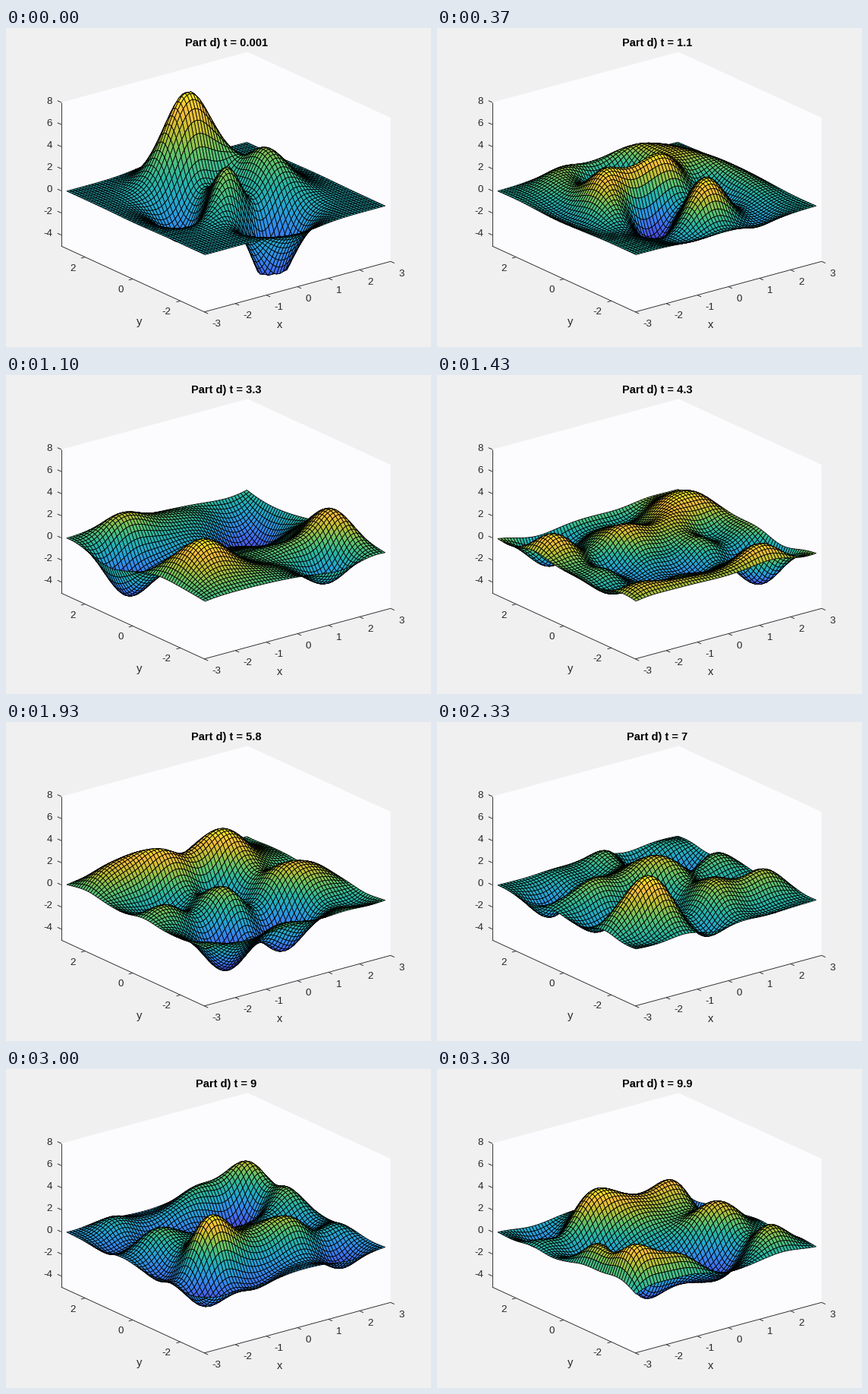
Recreate the animation shown at these times as a matplotlib script. Size 560 px wide and 420 px high, loop 3.33 s.

```python
import numpy as np
import matplotlib.pyplot as plt
from matplotlib.animation import FuncAnimation
from matplotlib.collections import PolyCollection
from matplotlib.colors import LinearSegmentedColormap

W, H = 560, 420
FRAMES, INTERVAL = 111, 30
PT = 0.72  # points per pixel at 100 dpi
Z_MIN, Z_MAX = -5, 8
INK = "#262626"

plt.rcParams["font.family"] = "Liberation Sans"

# Orthographic view: azimuth -37.5, elevation 30, stretched to the axes box
AZ, EL = np.radians(37.5), np.radians(30)
LEFT, BOTTOM, WIDTH, HEIGHT = 0.13 * W, 0.89 * H, 0.775 * W, 0.815 * H
SPAN = np.cos(AZ) + np.sin(AZ)
SX = WIDTH / SPAN
SY = HEIGHT / (SPAN * np.sin(EL) + np.cos(EL))


def project(x, y, z):
    """Stage pixels of a point in data coordinates."""
    u, v, w = (x + 3) / 6, (y + 3) / 6, (z - Z_MIN) / (Z_MAX - Z_MIN)
    px = LEFT + SX * (np.sin(AZ) * (1 - v) + np.cos(AZ) * u)
    rise = (np.sin(AZ) * u + np.cos(AZ) * v) * np.sin(EL) + np.cos(EL) * w
    return px, BOTTOM - SY * rise


def peaks(x, y):
    return (3 * (1 - x) ** 2 * np.exp(-x**2 - (y + 1) ** 2)
            - 10 * (x / 5 - x**3 - y**5) * np.exp(-x**2 - y**2)
            - np.exp(-(x + 1) ** 2 - y**2) / 3)


# Wave equation with fixed edges, solved by sine modes on the inner grid
N = 60
step = 6 / N
k = np.arange(1, N)
X, Y = np.meshgrid(-3 + step * k, -3 + step * k)
modes = np.sin(np.pi * np.outer(k, k) / N)
coef = (2 / N) ** 2 * modes @ peaks(X, Y) @ modes
lam = (2 / step * np.sin(np.pi * k / (2 * N))) ** 2
omega = np.sqrt(lam[:, None] + lam[None, :])


def wave(t):
    return modes @ (coef * np.cos(omega * t)) @ modes


# Evenly spaced key colours, indigo to yellow
cmap = LinearSegmentedColormap.from_list("heat", [
    "#423cc4", "#4661ea", "#3587ee", "#24a6d2", "#27b6a4",
    "#62c46c", "#bcc034", "#fabd3c", "#f8f41c"])

fig = plt.figure(figsize=(W / 100, H / 100), dpi=100, facecolor="#f0f0f0")
ax = fig.add_axes([0, 0, 1, 1])
ax.set_xlim(0, W)
ax.set_ylim(H, 0)
ax.axis("off")


def line(a, b):
    ax.plot([a[0], b[0]], [a[1], b[1]], color=INK, lw=0.9 * PT,
            solid_capstyle="butt")


def label(x, y, text, size=13.33, **kw):
    kw = {"color": INK, "ha": "center", "va": "baseline", **kw}
    return ax.text(x, y, text, fontsize=size * PT, **kw)


def tick(at, mark, offset, value, ha):
    line(at, (at[0] + mark[0], at[1] + mark[1]))
    label(at[0] + offset[0], at[1] + offset[1] + 4.8, f"{value}", ha=ha)


front, right, left = (project(x, y, Z_MIN)
                      for x, y in ((-3, -3), (3, -3), (-3, 3)))
right_top, back_top, left_top = (project(x, y, Z_MAX)
                                 for x, y in ((3, -3), (3, 3), (-3, 3)))

# White walls and floor, then the three axes
ax.fill(*zip(front, right, right_top, back_top, left_top, left),
        color="#fcfcfe", lw=0)
line(front, right)
line(front, left)
line(left, left_top)
for v in range(-3, 4):
    tick(project(v, -3, Z_MIN), (5, 2.3), (10.4, 14.8), v, "left")
for v in range(-2, 3, 2):
    tick(project(-3, v, Z_MIN), (-5.3, 1.4), (-12.2, 13.2), v, "right")
for v in range(-4, 9, 2):
    tick(project(-3, 3, v), (-5, -2.3), (-11.6, -3), v, "right")
label(361, 395, "x", 14.67)
label(176, 390.5, "y", 14.67)
title = label(290, 24, "", 14.67, color="black", weight="bold")

surface = PolyCollection([], edgecolors="black", linewidths=0.8 * PT)
ax.add_collection(surface, autolim=False)


def draw(i):
    n = (9 * i + 7) // 10  # 100 time steps spread over the loop
    t = n / 10 if n else 0.001
    z = wave(t)
    p = np.stack(project(X, Y, np.clip(z, Z_MIN, Z_MAX)), axis=-1)
    quads = np.stack([p[:-1, :-1], p[:-1, 1:], p[1:, 1:], p[1:, :-1]], axis=2)
    shade = (z[:-1, :-1] - z.min()) / (z.max() - z.min())
    # Reversed grid order paints the far cells first
    surface.set_verts(quads.reshape(-1, 4, 2)[::-1])
    surface.set_facecolor(cmap(shade.ravel()[::-1]))
    title.set_text(f"Part d) t = {t:g}")
    return surface, title


anim = FuncAnimation(fig, draw, frames=FRAMES, interval=INTERVAL,
                     repeat=True, repeat_delay=0, blit=False)
plt.show()
```
